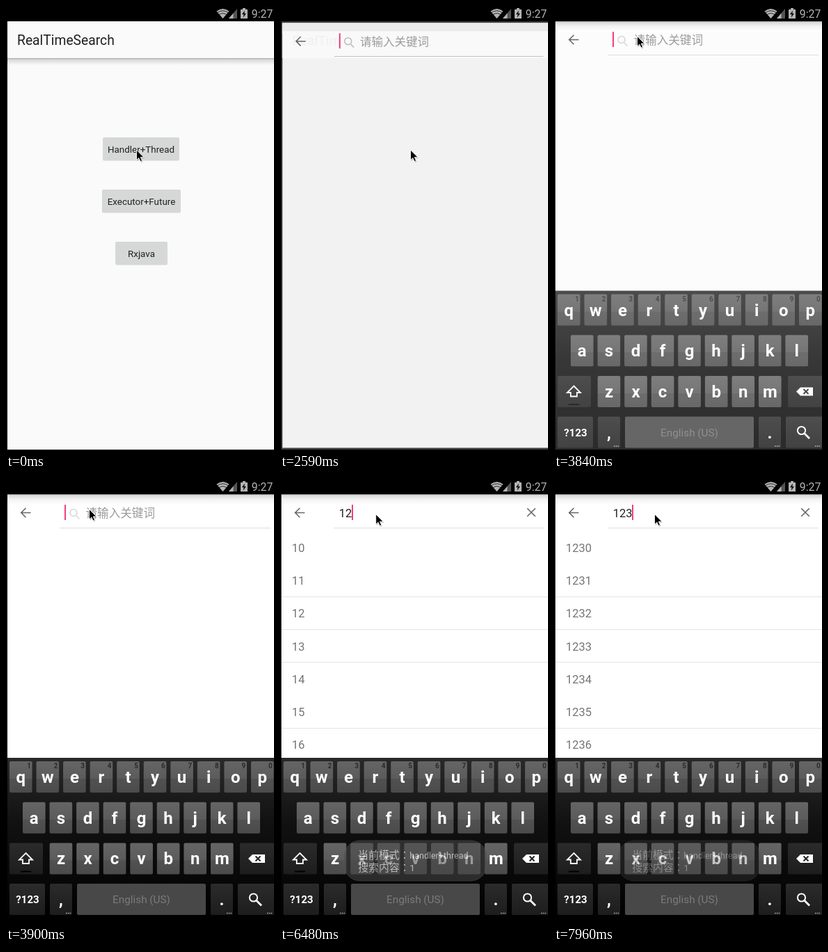
These frames come from a looping animation (385x640 px, 8 s). An HTML page:

```html
<!DOCTYPE html>
<html lang="zh-CN">
<head>
<meta charset="utf-8">
<title>RealTimeSearch</title>
<style>
html, body { margin: 0; width: 100%; height: 100%; overflow: hidden; background: #000; }
svg { display: block; font-family: Roboto, "Noto Sans CJK SC", "Noto Sans CJK", sans-serif; }
.mid { text-anchor: middle; }
.bold { font-weight: 700; }
.line { fill: none; stroke: #666; stroke-width: 1.6; }
.colon { font-family: "Noto Sans CJK TC", "Noto Sans CJK", sans-serif; }
</style>
</head>
<body>
<svg width="385" height="640">
  <defs>
    <linearGradient id="drop" x2="0" y2="1"><stop stop-color="#a2a2a2"/><stop offset=".2" stop-color="#d8d8d8"/><stop offset="1" stop-color="#fafafa"/></linearGradient>
    <linearGradient id="top" x2="0" y2="1"><stop stop-color="#a8a8a8"/><stop offset=".12" stop-color="#dcdcdc"/><stop offset=".5" stop-color="#f3f3f3"/><stop offset="1" stop-color="#fff"/></linearGradient>
    <linearGradient id="board" x2="0" y2="1"><stop stop-color="#292929"/><stop offset=".4" stop-color="#111"/><stop offset="1" stop-color="#000"/></linearGradient>
    <linearGradient id="cap" x2="0" y2="1"><stop stop-color="#656565"/><stop offset=".55" stop-color="#5b5b5b"/><stop offset=".56" stop-color="#515151"/><stop offset="1" stop-color="#4b4b4b"/></linearGradient>
    <linearGradient id="dark" x2="0" y2="1"><stop stop-color="#2b2b2b"/><stop offset="1" stop-color="#1d1d1d"/></linearGradient>
  </defs>

  <g id="home">
    <rect x="2" y="22" width="383" height="616" fill="#fafafa"/>
    <rect x="2" y="75" width="383" height="10" fill="url(#drop)"/>
    <text x="16" y="56" font-size="19.3" fill="#212121">RealTimeSearch</text>
    <g id="buttons" font-size="13.4" class="mid"></g>
  </g>

  <g id="search">
    <rect id="page" x="2" y="22" width="400" height="616"/>
    <rect x="2" y="22" width="400" height="15" fill="url(#top)"/>
    <g id="veil">
      <rect x="2" y="22" width="400" height="12" fill="#eaeaea"/>
      <rect x="2" y="34" width="400" height="39" fill="#f9f9f9"/>
      <text x="16" y="54" font-size="19.3" opacity=".035">RealTim</text>
    </g>
    <path class="line" d="M35.5 48.5H22M28.5 41.8L21.8 48.5L28.5 55.2"/>
    <path id="rule" d="M77 70.5H380"/>
    <g id="hint">
      <path id="lens" class="line" d="M101 53L105.5 57.5M92 48.5a5 5 0 1 0 10 0a5 5 0 1 0 -10 0"/>
      <text x="114.5" y="54.8" font-size="16.6" fill="#9b9b9b">请输入关键词</text>
    </g>
    <path id="clear" class="line" d="M355.2 42.2L366.8 53.8M366.8 42.2L355.2 53.8"/>
    <text id="query" x="84.8" y="55" font-size="16.5" fill="#212121"></text>
    <rect id="caret" y="37" width="2" height="22" fill="#ef3f7f"/>
    <g id="list" font-size="16.5" fill="#757575"></g>
  </g>

  <g id="keys"><rect x="2" y="401" width="383" height="237" fill="url(#board)"/></g>

  <g id="toast">
    <rect x="92" y="520" width="205" height="58" rx="23" fill="#4a4a4a" stroke="#5a5a5a" opacity=".93"/>
    <g font-size="14.8" fill="#fff">
      <text x="112.3" y="546">当前模式<tspan class="colon" lang="zh-TW">：</tspan><tspan font-size="12.5">handler+thread</tspan></text>
      <text x="112.3" y="563.5">搜索内容<tspan class="colon" lang="zh-TW">：</tspan><tspan font-size="13.5">1</tspan></text>
    </g>
  </g>

  <path d="M0 0H385V22H2V638H385V640H0Z"/>
  <g fill="#b4b4b4">
    <path d="M302.5 7.5Q311.5 .5 320.5 7.5L311.5 18Z"/>
    <path d="M303.5 9.6Q311.5 4 319.5 9.6M306 12.5Q311.5 8.5 317 12.5" fill="none" stroke="#000" stroke-width=".8"/>
    <path d="M332 4V18H320Z" fill="#555"/>
    <path d="M326.5 10.5V18H320Z"/>
    <path d="M337 5H340V3H344V5H347V18H337Z"/>
    <path d="M343 6.5L339 12H341.6L340.8 16.5L345 10.8H342.3Z" fill="#000"/>
    <text x="352.8" y="17" font-size="15.8">9:27</text>
  </g>
  <g id="pointer">
    <path d="M1 1.5V16L4.3 13L6.6 18L9 17L6.8 12H11.5Z" opacity=".25"/>
    <path d="M0 0V14.5L3.3 11.5L5.6 16.6L8 15.5L5.8 10.5H10.5Z" stroke="#fff" stroke-width=".9"/>
  </g>
</svg>
<script>
const $ = id => document.getElementById(id);
const add = (id, markup) => $(id).insertAdjacentHTML('beforeend', markup);
const show = (id, on) => $(id).setAttribute('visibility', on ? 'visible' : 'hidden');

// Value of the last [time, value] step that has begun
const at = (steps, t) => steps.filter(s => s[0] <= t).pop()[1];

const buttons = [['Handler+Thread', 139, 189, 110], ['Executor+Future', 138, 264, 113], ['Rxjava', 157, 339, 75]];
for (const [label, x, y, w] of buttons)
  add('buttons', `<rect x="${x}" y="${y}" width="${w}" height="33.5" rx="2" fill="#d6d7d7"/>
    <text x="${x + w / 2}" y="${y + 22}" fill="#212121">${label}</text>`);
const firstButton = $('buttons').firstElementChild;

function key(x, row, w, label = '', fill = 'url(#dark)') {
  const y = 406 + row * 58.7;
  add('keys', `<rect x="${x}" y="${y}" width="${w}" height="45" rx="2" fill="${fill}"/>
    <text class="mid bold" x="${x + w / 2}" y="${y + 31}" font-size="24" fill="#fff">${label}</text>`);
}
const pitch = 38.55;
[['qwertyuiop', 5], ['asdfghjkl', 24], ['zxcvbnm', 62.7]].forEach(([letters, x], row) =>
  [...letters].forEach((c, i) => key(x + i * pitch, row, 32.6, c, 'url(#cap)')));
[...'1234567890'].forEach((d, i) =>
  add('keys', `<text class="mid bold" x="${33 + i * pitch}" y="416" font-size="10" fill="#2b2b2b">${d}</text>`));
key(5, 2, 48);
key(336, 2, 50);
key(5, 3, 51);
key(63, 3, 32, ',');
key(102, 3, 185, '', '#484848');
key(294, 3, 32, '.');
key(333, 3, 53);
add('keys', `
  <text class="mid bold" x="31" y="610" font-size="15" fill="#fff">?123</text>
  <text class="mid" x="194.5" y="610" font-size="15.3" fill="#7b7b7b">English (US)</text>
  <path d="M28.5 538L38 547.5H33V553H24V547.5H19Z" fill="none" stroke="#fff" stroke-width="1.8"/>
  <path d="M21 564.5H36" stroke="#000" stroke-width="2"/>
  <path d="M348 546L354 540H372V552H354Z" fill="#fff"/>
  <path d="M358.5 542.5L365.5 549.5M365.5 542.5L358.5 549.5" stroke="#222" stroke-width="2"/>
  <circle cx="355.5" cy="602" r="5.6" fill="none" stroke="#fff" stroke-width="2"/>
  <path d="M359.8 606.3L367 613.5" stroke="#fff" stroke-width="2.8"/>`);
for (const x of [86, 317, 375])
  add('keys', `<path d="M${x} 624.5h8" stroke="#aaa" stroke-width="1.6" stroke-dasharray="1.6 1.2"/>`);

for (let i = 0; i < 7; i++) add('list', `<text x="17" y="${104.9 + i * 47.25}"></text>`);
for (const y of [169.5, 216.5, 263.5, 358.5]) add('list', `<path d="M2 ${y}H385" stroke="#e4e4e4"/>`);
const rows = $('list').querySelectorAll('text');

const opening = [[0, [.93, .5, .7]], [2590, [.992, 1, .25]], [2740, [1, 1, 0]]]; // scale, opacity, home opacity
const pointer = [[0, [187.5, 207]], [2850, [184, 190]], [2950, [175, 165]], [3050, [163, 145]], [3160, [152, 130]],
  [3370, [132, 85]], [3490, [119.5, 43.5]], [5830, [137.7, 50.7]], [7470, [144.5, 50.7]]];
const caret = [[0, 1], [3050, 0], [3490, 1], [4110, 0], [4320, 1], [4880, 0], [5140, 1], [5620, 0], [6220, 1],
  [6710, 0], [7170, 1], [7700, 0], [7960, 1]];
const query = [[0, ''], [5140, '1'], [6220, '12'], [7170, '123']];
const results = [[0, ''], [5620, '1'], [7170, '123']];
const toast = [[0, 0], [6390, .25], [6480, .6], [6620, .8], [6710, 1], [7700, .85], [7787, .67], [7873, .5], [7960, .33]];

function draw(t) {
  const [scale, alpha, dim] = at(opening, t);
  const searching = t >= 2480, moving = t < 2740, settled = t >= 3900;
  firstButton.setAttribute('fill', t >= 840 && t < 1130 ? '#bcbdbd' : '#d6d7d7');
  $('home').style.opacity = searching ? dim : 1;

  $('search').style.display = searching ? '' : 'none';
  $('search').setAttribute('opacity', alpha);
  $('search').setAttribute('transform', `translate(193 320) scale(${scale}) translate(-193 -320)`);
  $('page').setAttribute('fill', moving ? '#f2f2f2' : settled ? '#fff' : '#fcfcfc');
  $('veil').style.display = moving ? '' : 'none';
  $('rule').setAttribute('stroke', moving ? '#c4c4c4' : '#dedede');
  $('lens').style.stroke = moving ? '#bdbdbd' : '#d6d6d6';

  const typed = at(query, t), prefix = at(results, t);
  $('query').textContent = typed;
  $('caret').setAttribute('x', Math.round(84 + typed.length * 9.3));
  show('caret', at(caret, t));
  show('hint', !typed);
  show('clear', typed);
  show('list', prefix);
  rows.forEach((row, i) => row.textContent = prefix + i);

  show('keys', t >= 3840);
  $('keys').setAttribute('transform', `translate(0 ${settled ? 0 : 8.5})`);
  $('keys').setAttribute('opacity', settled ? 1 : .83);
  $('toast').setAttribute('opacity', at(toast, t));
  $('pointer').setAttribute('transform', `translate(${at(pointer, t)})`);
}

const start = performance.now();
function tick() {
  draw((performance.now() - start) % 8000);
  requestAnimationFrame(tick);
}
tick();
</script>
</body>
</html>
```
